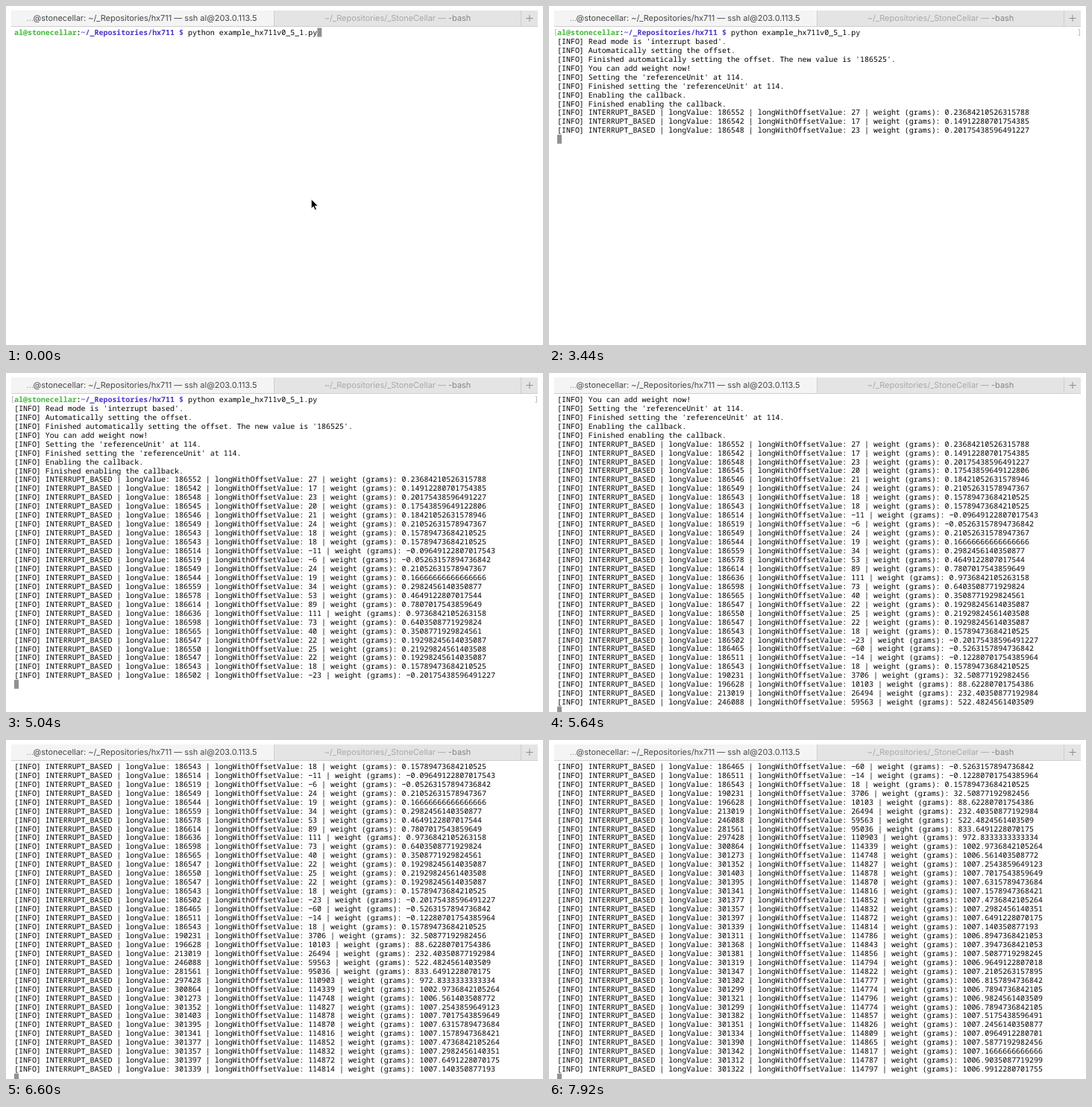
Write an HTML page that moves like this. It is 720x455 px and loops after 8 s.

```html
<!DOCTYPE html>
<html lang="en">
<head>
<meta charset="utf-8">
<title>Load cell readings in a terminal</title>
<style>
html, body { margin: 0; width: 100%; height: 100%; overflow: hidden; background: #fff; }
svg { display: block; width: 720px; height: 455px; }
text { white-space: pre; text-rendering: geometricPrecision; }
.tab { font: 10.95px Inter, "Open Sans", sans-serif; text-anchor: middle; }
#rows { font: 500 9.96px "Noto Sans Mono", "DejaVu Sans Mono", monospace; fill: #000; }
.prompt { font-weight: 700; }
</style>
</head>
<body>
<svg viewBox="0 0 720 455">
  <rect width="720" height="455" fill="#fff"/>
  <g id="rows"></g>
  <rect id="cursor" x="11" width="6" height="12" fill="#919191"/>
  <g id="marks" fill="none" stroke="#bdbdbd">
    <path d="M10.5 31.5h-2v8h2M709.5 31.5h2v8h-2"/>
  </g>

  <rect x="7" y="6" width="352" height="21" fill="#f4f4f4"/>
  <rect x="360" y="6" width="353" height="21" fill="#e4e4e4"/>
  <path d="M7 27.5H713M359.5 6V27M690.5 6V27" stroke="#cfcfcf" fill="none"/>
  <text class="tab" x="182" y="20" fill="#474747"><tspan fill="#9a9a9a">...</tspan>@stonecellar: ~/_Repositories/hx711 — ssh al@203.0.113.5</text>
  <text class="tab" x="525" y="20" fill="#a9a9a9">~/_Repositories/_StoneCellar — <tspan fill="#858585">-bash</tspan></text>
  <path d="M697.5 16.5h9M702 12v9" stroke="#8c8c8c" fill="none"/>

  <path id="pointer" d="M409.3 259.3v12.6l2.9-2.7 2 4.6 2.2-.9-2-4.5h4z" fill="#000" stroke="#fff" stroke-width=".8"/>
</svg>
<script>
const LOOP = 8000, TICK = 40;
const LEFT = 11, TOP = 29.4, PITCH = 11.95, ADVANCE = 5.976;
const FULL_ROWS = 35;
const OFFSET = 186525, UNIT = 114;
const ENTER = 480;
const FIRST_READING = 3247.5, PERIOD = 81.43, READINGS = 58;
const LOADED_AT = 26, LOAD = 114820;

const $ = id => document.getElementById(id);
const rowsGroup = $("rows"), cursor = $("cursor"), marks = $("marks"), pointer = $("pointer");
const command = "python example_hx711v0_5_1.py";
const promptParts = [["al@stonecellar", "#45b93c"], [":", "#222"], ["~/_Repositories/hx711 $ ", "#4b35c8"]];
const commandLength = promptParts.reduce((n, [s]) => n + s.length, command.length);

const signed = n => String(n).replace("-", "\u2212");
const onTick = t => Math.ceil(t / TICK) * TICK;

// Repeatable noise from -1 to 1
function noise(i) {
  const s = Math.sin((i + 1) * 12.9898) * 43758.5453;
  return (s - Math.floor(s)) * 2 - 1;
}

const bump = (i, center, width) => Math.exp(-(((i - center) / width) ** 2));

// The empty scale drifts a little, then the load settles on it along an S-curve
function reading(i) {
  if (i < LOADED_AT) {
    const drift = 85 * bump(i, 14.8, 1.7) - 50 * bump(i, 8.5, 0.8) - 78 * bump(i, 22.9, 1.2);
    return Math.round(22 + drift + 6 * noise(i));
  }
  const k = i - LOADED_AT;
  const settled = 1 / (1 + Math.exp(3.4 - 1.05 * k - 0.012 * k ** 3));
  return Math.round(settled * (LOAD + 60 * noise(i)));
}

function svgNode(name, attrs, parent) {
  const node = document.createElementNS("http://www.w3.org/2000/svg", name);
  for (const key in attrs) node.setAttribute(key, attrs[key]);
  return parent.appendChild(node);
}

const lines = [];
function addLine(time, content) {
  const y = TOP + lines.length * PITCH + 9.5;
  const node = svgNode("text", { x: LEFT, y }, rowsGroup);
  node.textContent = content;
  lines.push({ time, node });
  return node;
}

const first = addLine(0, "");
for (const [part, fill] of promptParts)
  svgNode("tspan", { class: "prompt", fill }, first).textContent = part;
svgNode("tspan", {}, first).textContent = command;

[
  [800, "Read mode is 'interrupt based'."],
  [3120, "Automatically setting the offset."],
  [3200, `Finished automatically setting the offset. The new value is '${OFFSET}'.`],
  [3200, "You can add weight now!"],
  [3200, `Setting the 'referenceUnit' at ${UNIT}.`],
  [3200, `Finished setting the 'referenceUnit' at ${UNIT}.`],
  [3200, "Enabling the callback."],
  [3200, "Finished enabling the callback."]
].forEach(([time, message]) => addLine(time, "[INFO] " + message));

for (let i = 0; i < READINGS; i++) {
  const n = reading(i);
  addLine(
    onTick(FIRST_READING + i * PERIOD),
    `[INFO] INTERRUPT_BASED | longValue: ${OFFSET + n} | longWithOffsetValue: ${signed(n)}` +
    ` | weight (grams): ${signed(n / UNIT)}`
  );
}

const show = (node, on) => node.setAttribute("visibility", on ? "visible" : "hidden");

function draw(t) {
  const count = lines.filter(line => line.time <= t).length;
  const top = Math.max(0, count - FULL_ROWS);
  lines.forEach((line, i) => show(line.node, i >= top && i < count));
  rowsGroup.setAttribute("transform", `translate(0 ${-top * PITCH})`);

  const entered = t >= ENTER;
  cursor.setAttribute("x", entered ? LEFT : LEFT + commandLength * ADVANCE);
  cursor.setAttribute("y", TOP + (entered ? count - top : 0) * PITCH);
  show(marks, entered && top === 0);
  show(pointer, !entered);
}

const start = performance.now();
function frame() {
  draw((performance.now() - start) % LOOP);
  requestAnimationFrame(frame);
}
frame();
</script>
</body>
</html>
```
